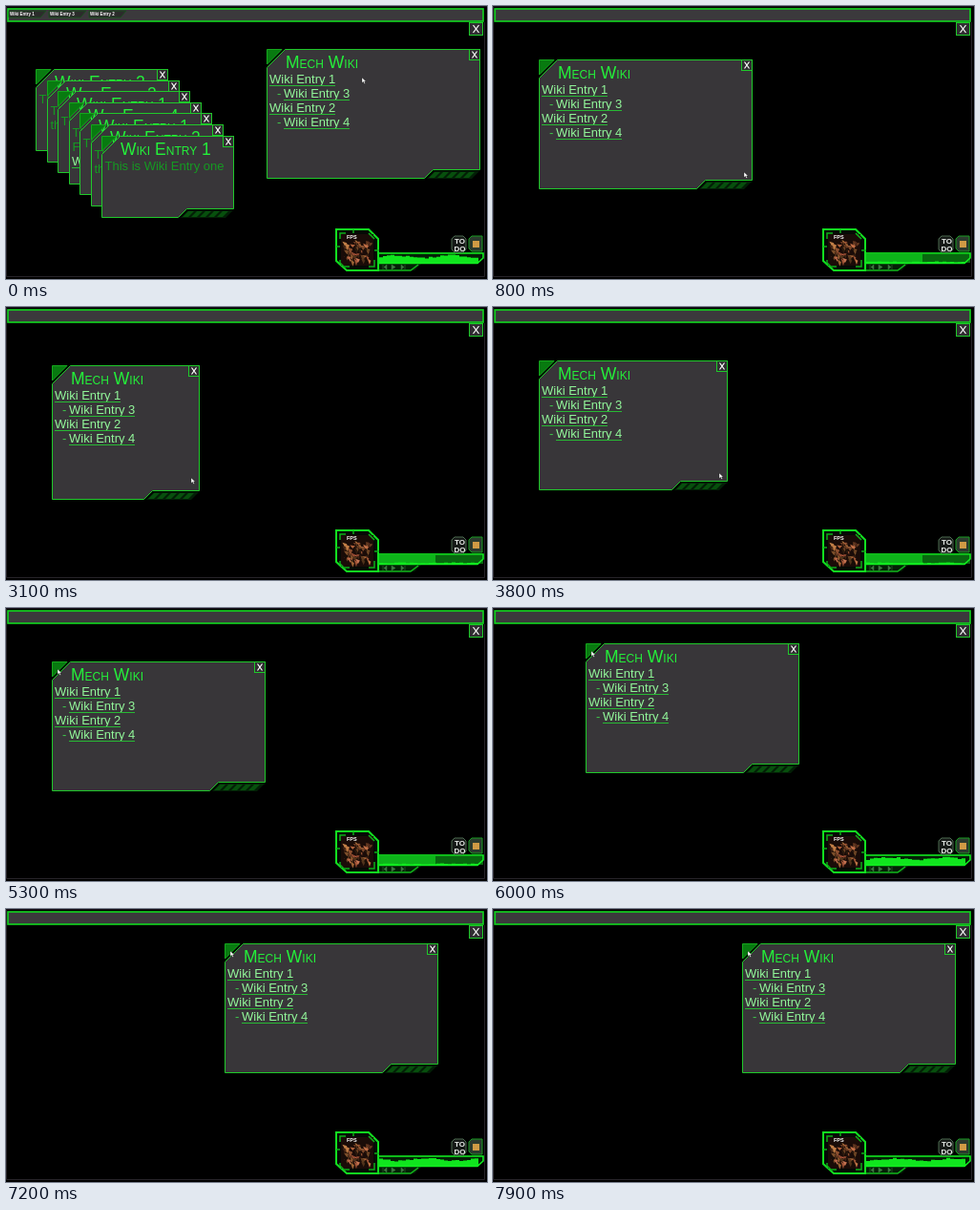
Write an HTML page that moves like this. It is 504 px wide and 286 px high and loops after 8 s.

```html
<!DOCTYPE html>
<html lang="en">
<head>
<meta charset="utf-8">
<title>Mech Wiki</title>
<style>
html, body { margin: 0; width: 100%; height: 100%; overflow: hidden; background: #000; }
svg { display: block; width: 504px; height: 286px; font-family: "Liberation Sans", Arial, sans-serif; }
.panel { fill: #383639; stroke: #1fc92a; }
.corner { fill: #087a10; stroke: #14a81c; }
.grip { fill: #031f06; }
.hatch { fill: #074f0d; }
.box { fill: #302e31; stroke: #1fc92a; }
.cross { fill: none; stroke: #fff; stroke-width: 1.2; }
.title { font-size: 17.5px; font-variant: small-caps; fill: #24f03a; }
.copy { font-size: 13px; fill: #159a22; }
.link { font-size: 13px; fill: #92f79a; }
.dash { font-size: 13px; fill: #3fc74b; }
.rule { stroke: #27b934; }
.tab { fill: #2b2c2b; stroke: #145a19; stroke-width: .7; }
.tabText { font-size: 4.5px; font-weight: bold; fill: #fff; }
.frame { fill: #050905; stroke: #12df20; stroke-width: 2; }
</style>
</head>
<body>
<svg id="stage" viewBox="0 0 504 286">
  <rect width="504" height="286"/>
  <path d="M.5 0V283.5H501.5V17" fill="none" stroke="#262329"/>
  <path d="M0 .5H504" stroke="#17131a"/>
  <rect x="2" y="3" width="498" height="13" fill="#3b393c" stroke="#12d820" stroke-width="1.6"/>
  <rect class="box" x="485.5" y="17.5" width="14" height="13"/>
  <path class="cross" d="M489.5 20l6 8m0-8l-6 8"/>
  <g id="opening"></g>
  <g id="windows"></g>

  <g id="player">
    <path d="M390 258H500V264L494 270H435L428 277H388Z" fill="#042006"/>
    <g id="meter">
      <rect x="391" y="260" width="109" height="9" fill="#08680f"/>
      <rect x="391" y="260" width="59" height="9" fill="#0db41a"/>
    </g>
    <path id="wave" fill="#10e51e"/>
    <path d="M390 259H500V264L494 269.5H390" fill="none" stroke="#12ee20" stroke-width="1.6"/>
    <path d="M390 277H424L432 271" fill="none" stroke="#12b81c" stroke-width="1.5"/>
    <path d="M395 271v5m4-5l-3 2.500l3 2.500zM404 271l4 2.500l-4 2.500zM414 271l3 2.500l-3 2.500zm4 0v5" fill="#3d7740" stroke="#3d7740" stroke-width=".5"/>
    <path class="frame" d="M346 234H380L390 244V277H357L346 267Z"/>
    <rect x="351" y="239" width="34" height="33" fill="#1a0c08"/>
    <g id="portrait"></g>
    <path d="M350 244V238H356M380 238l6 6M350 266v3l4 4h6M386 266v7h-6M346 252h4M386 256h5M364 234v4" fill="none" stroke="#0fae1a" stroke-width="1.5"/>
    <text x="357" y="243.5" font-size="5.5" font-weight="bold" fill="#fff">FPS</text>
    <path d="M470 241H479L482 244V255L479 258H470L467 255V244Z" fill="#161a17" stroke="#4d6a51"/>
    <g font-size="8" font-weight="bold" fill="#e8ece8" text-anchor="middle">
      <text x="475.500" y="249">TO</text>
      <text x="475.500" y="256.500">DO</text>
    </g>
    <path d="M488 241H499V257H488L485 254V244Z" fill="#2c3a2e" stroke="#169a20"/>
    <rect x="489" y="246" width="7" height="7" fill="#d09a45"/>
  </g>
  <path id="cursor" d="M0 0V5.500L1.400 4.300L2.500 6.500L3.500 6L2.500 3.900H4.200Z" fill="#fff" stroke="#000" stroke-width=".3"/>
</svg>
<script>
const $ = id => document.getElementById(id);
const LOOP = 8000, STEP = 100;
const CUT = 500, DRAG = 5400;
const WIDE = 224, TALL = 136;

const noise = n => { const s = Math.sin(n * 12.9898) * 43758.5453; return s - Math.floor(s); };

function add(parent, tag, attrs, text) {
  const el = document.createElementNS("http://www.w3.org/2000/svg", tag);
  for (const key in attrs) el.setAttribute(key, attrs[key]);
  if (text) el.textContent = text;
  parent.appendChild(el);
  return el;
}

function makeWindow(parent, title) {
  const g = add(parent, "g", {});
  const panel = add(g, "path", { class: "panel" });
  add(g, "path", { class: "corner", d: "M.5 .5H16L.5 16Z" });
  const close = add(g, "g", {});
  add(close, "rect", { class: "box", x: .5, y: .5, width: 11, height: 11 });
  add(close, "path", { class: "cross", d: "M3.500 2.500l5 7m0-7l-5 7" });
  const grip = add(g, "g", {});
  add(grip, "path", { class: "grip", d: "M-56 0l8-8h47l-8 8z" });
  for (let x = -54; x < -10; x += 9) add(grip, "path", { class: "hatch", d: `M${x} -1l6-6h6l-6 6z` });
  add(g, "text", { class: "title", x: 20, y: 20 }, title);
  function place(x, y, w, h) {
    g.setAttribute("transform", `translate(${x} ${y})`);
    close.setAttribute("transform", `translate(${w - 12} 0)`);
    grip.setAttribute("transform", `translate(${w} ${h})`);
    panel.setAttribute("d", `M.5 19.5L19.5 .5H${w - .5}V${h - 9.5}H${w - 49.5}L${w - 58.5} ${h - .5}H.5Z`);
  }
  return { g, place };
}

function addLink(g, x, y, text) {
  add(g, "text", { class: "link", x, y }, text);
  add(g, "path", { class: "rule", d: `M${x} ${y + 2.5}h69` });
}

// Cascaded entries, back to front
const one = ["This is Wiki Entry one"];
const two = ["This is Wiki Entry", "that has two lines"];
const entries = [[2, one], [2, two], [1, one], [4, ["This is Wiki Entry", "Four", "Wiki Entry 1"]],
  [1, one], [2, two], [1, one]];
entries.forEach(([n, lines], i) => {
  const win = makeWindow($("opening"), "Wiki Entry " + n);
  win.place(Math.round(31 + i * 11.5), Math.round(66 + i * 11.6), 139, 86);
  lines.forEach((line, j) => {
    const y = 36 + j * 15;
    if (j === 2) addLink(win.g, 3, y, line);
    else add(win.g, "text", { class: "copy", x: 3.5, y }, line);
  });
});

[1, 3, 2].forEach((n, i) => {
  const x = 3 + i * 42;
  add($("opening"), "path", { class: "tab", d: `M${x} 5H${x + 39}L${x + 33} 12H${x}Z` });
  add($("opening"), "text", { class: "tabText", x: x + 1, y: 10 }, "Wiki Entry " + n);
});

const wiki = makeWindow($("windows"), "Mech Wiki");
[1, 3, 2, 4].forEach((n, i) => {
  const y = 36 + i * 15, nested = i % 2;
  if (nested) add(wiki.g, "text", { class: "dash", x: 11, y }, "-");
  addLink(wiki.g, nested ? 18 : 3, y, "Wiki Entry " + n);
});

// Rusty shards inside the portrait frame
for (let i = 0; i < 70; i++) {
  const r = k => noise(i * 5 + k);
  const x = 352 + r(1) * 27, y = 245 + r(2) * 21;
  add($("portrait"), "path", {
    d: `M${x} ${y}l${2 + r(3) * 4} ${r(4) * 3}l${-r(3) * 3} ${2 + r(4) * 3}z`,
    fill: `hsl(${12 + r(5) * 18} 50% ${5 + r(6) * 50}%)`
  });
}

// Pointer path: time, x, y
const path = [
  [500, 263, 174], [1000, 263, 174], [1800, 176, 173], [2100, 159, 160],
  [3100, 194, 179], [3800, 237, 174], [4400, 263, 174], [4600, 263, 174],
  [5200, 54, 64], [5500, 54, 64], [5900, 104, 42], [6500, 97, 79],
  [7200, 235, 44], [7900, 267, 44]
];

function pointerAt(t) {
  const i = path.findIndex(k => k[0] >= t);
  if (i < 1) return path[0].slice(1);
  const a = path[i - 1], b = path[i];
  const p = (t - a[0]) / (b[0] - a[0]);
  const ease = p * p * (3 - 2 * p);
  return [1, 2].map(j => Math.round(a[j] + (b[j] - a[j]) * ease));
}

// The pointer first pulls the grip, then carries the window by its corner
function windowAt(t, x, y) {
  if (t < CUT) return [273, 45, WIDE, TALL];
  if (t < 4600) return [48, y - 118, x - 39, y - 38];
  if (t < DRAG) return [48, 56, WIDE, TALL];
  return [x - 6, y - 8, WIDE, TALL];
}

function drawWave(t) {
  const loud = t < CUT || t > 5700;
  const steps = t / STEP;
  let d = "M391 269.500";
  for (let i = 0; i < 26; i++) {
    const jitter = noise(i * 7.1 + steps * 3.3);
    const swell = .5 + .5 * Math.sin(i * .42 + steps * .3);
    const high = loud ? 5 + 2.5 * swell + 1.5 * jitter : 1 + jitter;
    d += `V${(269.5 - high).toFixed(1)}h4`;
  }
  $("wave").setAttribute("d", d + "V269.500Z");
  $("meter").style.display = loud ? "none" : "";
}

function draw(now) {
  const t = Math.floor((now % LOOP) / STEP) * STEP;
  const [x, y] = t < CUT ? [373, 75] : pointerAt(t);
  $("opening").style.display = t < CUT ? "" : "none";
  wiki.place(...windowAt(t, x, y));
  $("cursor").setAttribute("transform", `translate(${x} ${y})`);
  drawWave(t);
}

const start = performance.now();
function tick() {
  draw(performance.now() - start);
  requestAnimationFrame(tick);
}
tick();
</script>
</body>
</html>
```
